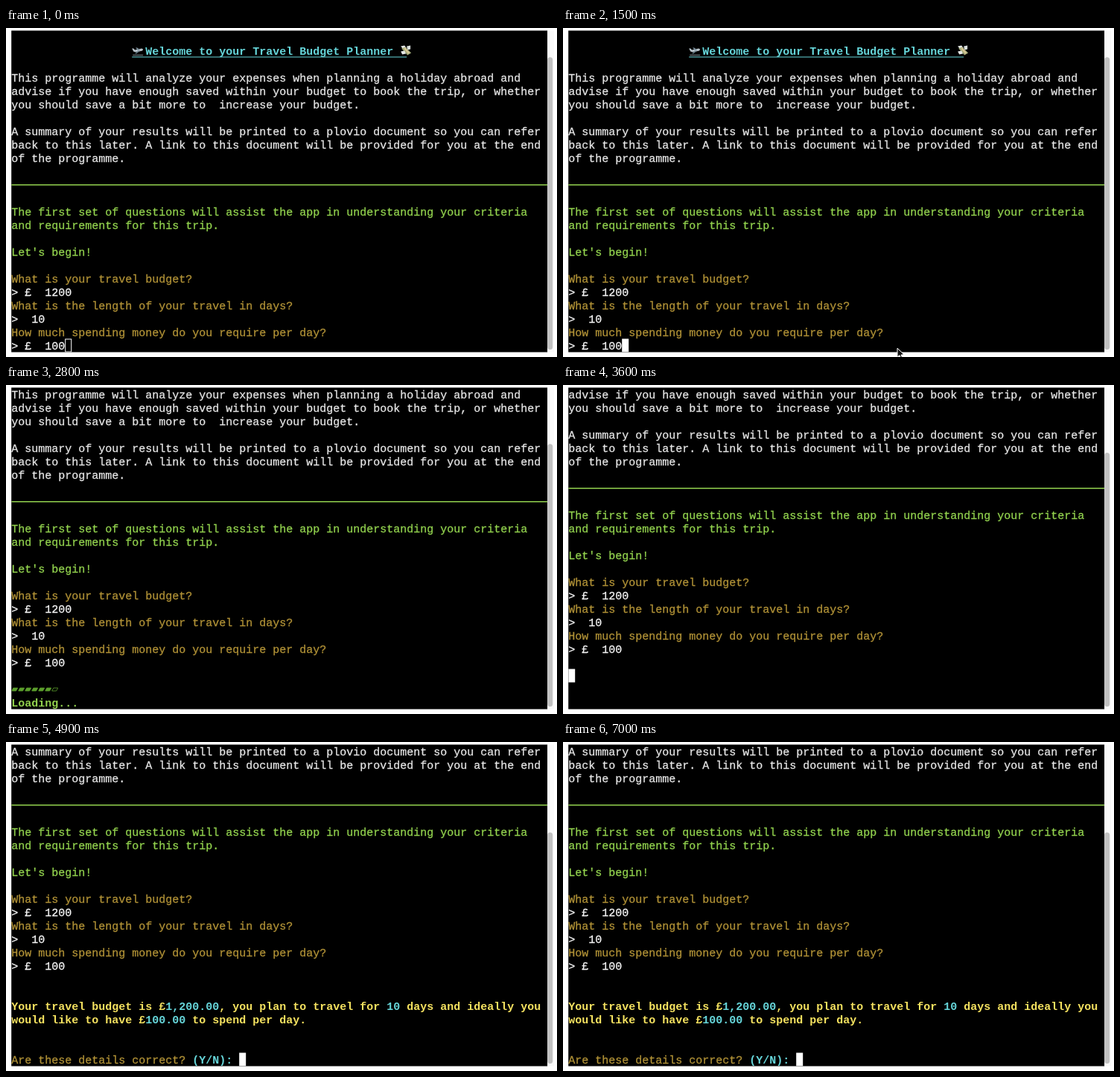
These frames come from a looping animation (740x442 px, 7.1 s). An HTML page with a canvas:

```html
<!DOCTYPE html>
<html lang="en">
<head>
<meta charset="utf-8">
<title>Travel Budget Planner</title>
<style>
html, body { margin: 0; width: 100%; height: 100%; overflow: hidden; background: #fff; }
canvas { display: block; width: 740px; height: 442px; }
</style>
</head>
<body>
<canvas id="stage" width="740" height="442"></canvas>
<script>
const ctx = document.getElementById('stage').getContext('2d');
const LOOP = 7100, TICK = 100;
const LEFT = 7.2, TOP = 3.5, CELL = 9, ROW = 18, COLS = 80, ROWS = 24;
const WIDTH = COLS * CELL, HEIGHT = ROWS * ROW;
const ENTER = 1700, LOADED = 3600, SUMMARY = 3800;
const FONT = '15px "Liberation Mono", monospace';
const WHITE = '#e6e6e6', BRIGHT = '#f6f6f6', GREEN = '#92d24e', DARK_GREEN = '#5b9e2c';
const GOLD = '#b09136', YELLOW = '#f6e360', CYAN = '#66d6da';

const span = (text, color, bold = false) => ({ text, color, bold });
const plain = text => [span(text, WHITE)];
const typed = text => [span(text, BRIGHT)];
const green = text => [span(text, GREEN)];
const gold = text => [span(text, GOLD)];
const strong = text => span(text, YELLOW, true);
const value = text => span(text, CYAN, true);

const intro = [
  [], [span(' '.repeat(20) + 'Welcome to your Travel Budget Planner', CYAN, true)], [],
  plain('This programme will analyze your expenses when planning a holiday abroad and'),
  plain('advise if you have enough saved within your budget to book the trip, or whether'),
  plain('you should save a bit more to  increase your budget.'),
  [],
  plain('A summary of your results will be printed to a plovio document so you can refer'),
  plain('back to this later. A link to this document will be provided for you at the end'),
  plain('of the programme.'),
  [], [], [],
  green('The first set of questions will assist the app in understanding your criteria'),
  green('and requirements for this trip.'),
  [],
  green("Let's begin!"),
  [],
  gold('What is your travel budget?'),
  typed('> £  1200'),
  gold('What is the length of your travel in days?'),
  typed('>  10'),
  gold('How much spending money do you require per day?'),
  typed('> £  100')
];
const loading = [...intro, [], [], [span('Loading...', GREEN, true)]];
const summary = [
  ...intro, [], [],
  [strong('Your travel budget is £'), value('1,200.00'), strong(', you plan to travel for '),
    value('10'), strong(' days and ideally you')],
  [strong('would like to have £'), value('100.00'), strong(' to spend per day.')],
  [], [],
  [span('Are these details correct? ', GOLD), value('(Y/N): ')]
];
const TITLE_LINE = 1, RULE_LINE = 11, SPINNER_LINE = 25;

function rect(x, y, w, h, color) {
  ctx.fillStyle = color;
  ctx.fillRect(x, y, w, h);
}

function poly(points, color) {
  ctx.beginPath();
  points.forEach(([x, y]) => ctx.lineTo(x, y));
  ctx.closePath();
  ctx.fillStyle = color;
  ctx.fill();
}

function drawLine(spans, y) {
  let col = 0;
  for (const { text, color, bold } of spans) {
    const x = LEFT + col * CELL;
    ctx.font = (bold ? 'bold ' : '') + FONT;
    ctx.fillStyle = ctx.strokeStyle = color;
    ctx.fillText(text, x, y + 14);
    if (!bold) {
      ctx.lineWidth = 0.3;
      ctx.strokeText(text, x, y + 14);
    }
    col += text.length;
  }
}

function drawPlane(x, y) {
  ctx.save();
  ctx.translate(x, y);
  poly([[0, 6], [2, 6], [4, 8], [13, 6], [15, 7], [14, 9], [5, 11], [2, 10]], '#b9c4cb');
  poly([[5, 5], [7, 5], [11, 8], [8, 9]], '#7e929e');
  poly([[7, 10], [11, 9], [6, 13], [4, 13]], '#637985');
  rect(1, 14, 14, 2, '#4c5558');
  ctx.restore();
}

function drawMoney(x, y) {
  ctx.save();
  ctx.translate(x, y);
  poly([[1, 3], [6, 2], [9, 6], [5, 8]], '#e5e8e6');
  poly([[9, 3], [14, 2], [14, 7], [10, 8]], '#d9dfdc');
  poly([[2, 6], [7, 4], [15, 12], [10, 15]], '#a3aa78');
  poly([[5, 6], [7, 5], [13, 12], [11, 13]], '#d9c696');
  poly([[1, 10], [6, 9], [8, 13], [3, 14]], '#e5e8e6');
  ctx.restore();
}

function drawTitleTrim(y) {
  rect(LEFT + 18 * CELL, y + 17, 41 * CELL, 1, CYAN);
  drawPlane(LEFT + 18 * CELL, y);
  drawMoney(LEFT + 58 * CELL, y);
}

function drawSpinner(y, filled) {
  ctx.lineWidth = 0.8;
  ctx.strokeStyle = DARK_GREEN;
  for (let i = 0; i < 7; i++) {
    const x = LEFT + i * CELL;
    poly([[x + 2.6, y + 7.5], [x + 8.5, y + 7.5], [x + 6.4, y + 11.5], [x + 0.5, y + 11.5]],
      i < filled ? DARK_GREEN : '#000');
    ctx.stroke();
  }
}

function drawCaret(col, row, solid) {
  const x = LEFT + col * CELL, y = TOP + row * ROW;
  if (solid) return rect(x, y, CELL, ROW, '#fff');
  ctx.strokeStyle = '#fff';
  ctx.lineWidth = 1;
  ctx.strokeRect(x + 0.5, y + 0.5, CELL - 1, ROW - 1);
}

function drawScrollbar(scroll) {
  rect(LEFT + WIDTH, TOP, 9, HEIGHT, '#f9f9f9');
  const size = HEIGHT * ROWS / (scroll + 26.4);
  ctx.beginPath();
  ctx.roundRect(LEFT + WIDTH, HEIGHT - size, 7, size, 3.5);
  ctx.fillStyle = '#c1c1c1';
  ctx.fill();
}

function drawPointer(t) {
  if (t < 600 || t >= 1600) return;
  // Rises from the bottom edge, clicks, then drops back out.
  const lift = Math.sin(Math.PI * (t - 500) / 1100);
  ctx.save();
  ctx.translate(449, 442 - 42 * lift);
  poly([[0, 0], [0, 12], [3, 9.5], [5, 14], [7, 13], [5, 9], [9, 8.5]], '#111');
  ctx.strokeStyle = '#fff';
  ctx.lineWidth = 1;
  ctx.stroke();
  ctx.restore();
}

function sceneAt(t) {
  if (t < ENTER) return { lines: intro, scroll: 0, caret: [8, 23, t >= 1000] };
  if (t < LOADED) {
    const step = Math.floor((t - ENTER) / 80) % 8;
    return { lines: loading, scroll: 3, filled: step % 7 + 1 };
  }
  if (t < SUMMARY) return { lines: intro, scroll: 4, caret: [0, 21, true] };
  return { lines: summary, scroll: 7, caret: [34, 23, true] };
}

function draw(now) {
  const t = Math.floor(now % LOOP / TICK) * TICK;
  const { lines, scroll, caret, filled } = sceneAt(t);
  const lineTop = i => TOP + (i - scroll) * ROW;

  rect(0, 0, 740, 442, '#fff');
  rect(LEFT, TOP, WIDTH, HEIGHT, '#000');
  ctx.save();
  ctx.beginPath();
  ctx.rect(LEFT, TOP, WIDTH, HEIGHT);
  ctx.clip();
  for (let i = scroll; i < lines.length; i++) drawLine(lines[i], lineTop(i));
  if (scroll <= TITLE_LINE) drawTitleTrim(lineTop(TITLE_LINE));
  rect(LEFT, lineTop(RULE_LINE) + 8.5, WIDTH, 1.5, GREEN);
  if (filled) drawSpinner(lineTop(SPINNER_LINE), filled);
  if (caret) drawCaret(...caret);
  ctx.restore();
  drawScrollbar(scroll);
  drawPointer(t);
}

const start = performance.now();
function loop() {
  draw(performance.now() - start);
  requestAnimationFrame(loop);
}
loop();
</script>
</body>
</html>
```
